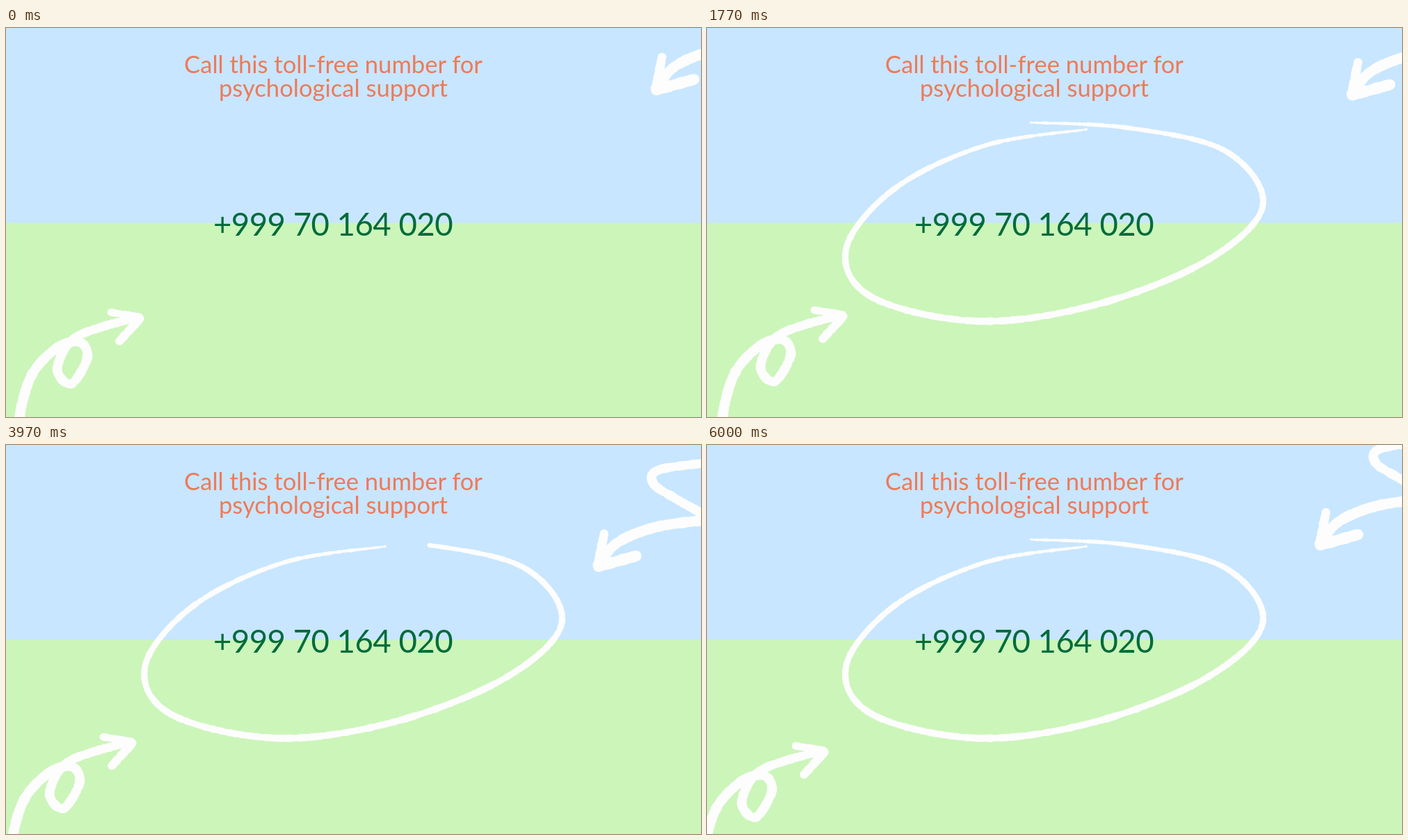
An HTML page with a canvas that plays this animation: 999x560 px, repeating every 6.03 s.

```html
<!DOCTYPE html>
<html lang="en">
<head>
<meta charset="utf-8">
<title>Support line</title>
<style>
  html, body { margin: 0; width: 100%; height: 100%; overflow: hidden; background: #c8e6ff; }
  canvas, svg { position: absolute; left: 0; top: 0; width: 999px; height: 560px; display: block; }
  text { font-family: Lato, "Open Sans", sans-serif; text-anchor: middle; }
  .title { font-size: 34.6px; fill: #ee7a58; }
  .phone { font-size: 45.5px; letter-spacing: -0.5px; fill: #006b3a; }
</style>
</head>
<body>
<canvas id="stage" width="999" height="560"></canvas>
<svg viewBox="0 0 999 560">
  <text class="title" x="470.5" y="64.5">Call this toll-free number for</text>
  <text class="title" x="470.5" y="99">psychological support</text>
  <text class="phone" x="470" y="299">+999 70 164 020</text>
</svg>
<script>
const ctx = document.getElementById('stage').getContext('2d');
const LOOP = 6030, RING_PERIOD = LOOP / 2, RING_DRAW = 1055;
const HORIZON = 280.5;

let seed = 7;
const rand = () => (seed = (seed * 16807) % 2147483647) / 2147483647;

const spline = (a, b, c, d, t) =>
  0.5 * (2 * b + (c - a) * t + (2 * a - 5 * b + 4 * c - d) * t * t + (3 * b - a - 3 * c + d) * t * t * t);

// Lays chalky dabs about 1px apart along a curve; width(u) is given for u from 0 to 1.
function brush(width, ...points) {
  const at = i => points[Math.max(0, Math.min(points.length - 1, i))];
  const dabs = [];
  let len = 0, x0, y0, wobble = 0;
  for (let i = 0; i < points.length - 1; i++) {
    for (let k = 0; k < 200; k++) {
      const [x, y] = [0, 1].map(j => spline(at(i - 1)[j], at(i)[j], at(i + 1)[j], at(i + 2)[j], k / 200));
      const step = dabs.length ? Math.hypot(x - x0, y - y0) : 1;
      if (step < 1) continue;
      len += step;
      wobble = wobble * 0.6 + (rand() - 0.5) * 0.7;
      dabs.push({ x, y, len, wobble });
      [x0, y0] = [x, y];
    }
  }
  for (const d of dabs) d.r = width(d.len / len) / 2 + d.wobble;
  return dabs;
}

function toPath(dabs) {
  const path = new Path2D();
  for (const { x, y, r } of dabs) {
    path.moveTo(x + r, y);
    path.arc(x, y, r, 0, Math.PI * 2);
  }
  return path;
}

const even = w => () => w;
const swell = u => 3 + 7 * Math.sin(Math.PI * u) ** 0.7;

const curlyArrow = toPath([
  ...brush(u => 15 - 3 * u, [12, 606], [20, 545], [38, 496], [74, 461], [104, 455], [114, 478],
    [91, 515], [71, 494], [91, 453], [135, 433], [188, 420]),
  ...brush(even(11), [148, 412], [190, 419]),
  ...brush(even(12), [190, 421], [160, 454])
]);

const foldedArrow = toPath([
  ...brush(even(15), [934, 87], [962, 55], [1015, 33], [1081, 23]),
  ...brush(even(13), [1081, 22], [1086, 15], [1045, -9], [1014, -30], [1022, -50], [1100, -61]),
  ...brush(even(13), [943, 42], [934, 88]),
  ...brush(even(16), [935, 89], [989, 74])
]);

const ring = brush(swell, [545, 146], [400, 169], [270, 231], [200, 318], [238, 388], [390, 422],
  [560, 398], [720, 334], [799, 255], [745, 177], [607, 144], [465, 136]);

function drawAt(path, dx, dy) {
  ctx.save();
  ctx.translate(dx, dy);
  ctx.fill(path);
  ctx.restore();
}

// Offset along a diagonal swing of the given size, between 0 and -2 * size.
const swing = (t, size, period) => size * (Math.cos(t / period * Math.PI * 2) - 1);

function draw(t) {
  ctx.fillStyle = '#c8e6ff';
  ctx.fillRect(0, 0, 999, 560);
  ctx.fillStyle = '#ccf5ba';
  ctx.fillRect(0, HORIZON, 999, 560);

  ctx.fillStyle = '#fdfdfd';
  const a = 6 + swing(t + 130, 36, 1910);
  drawAt(curlyArrow, a, -a);
  const b = swing(t, 42.5, 1618);
  drawAt(foldedArrow, b, -b * 1.03);

  const drawn = Math.min(1, (t % RING_PERIOD) / RING_DRAW);
  if (drawn > 0.02) ctx.fill(toPath(ring.slice(0, Math.round(ring.length * drawn))));
}

const start = performance.now();
function tick() {
  draw((performance.now() - start) % LOOP);
  requestAnimationFrame(tick);
}
tick();
</script>
</body>
</html>
```
